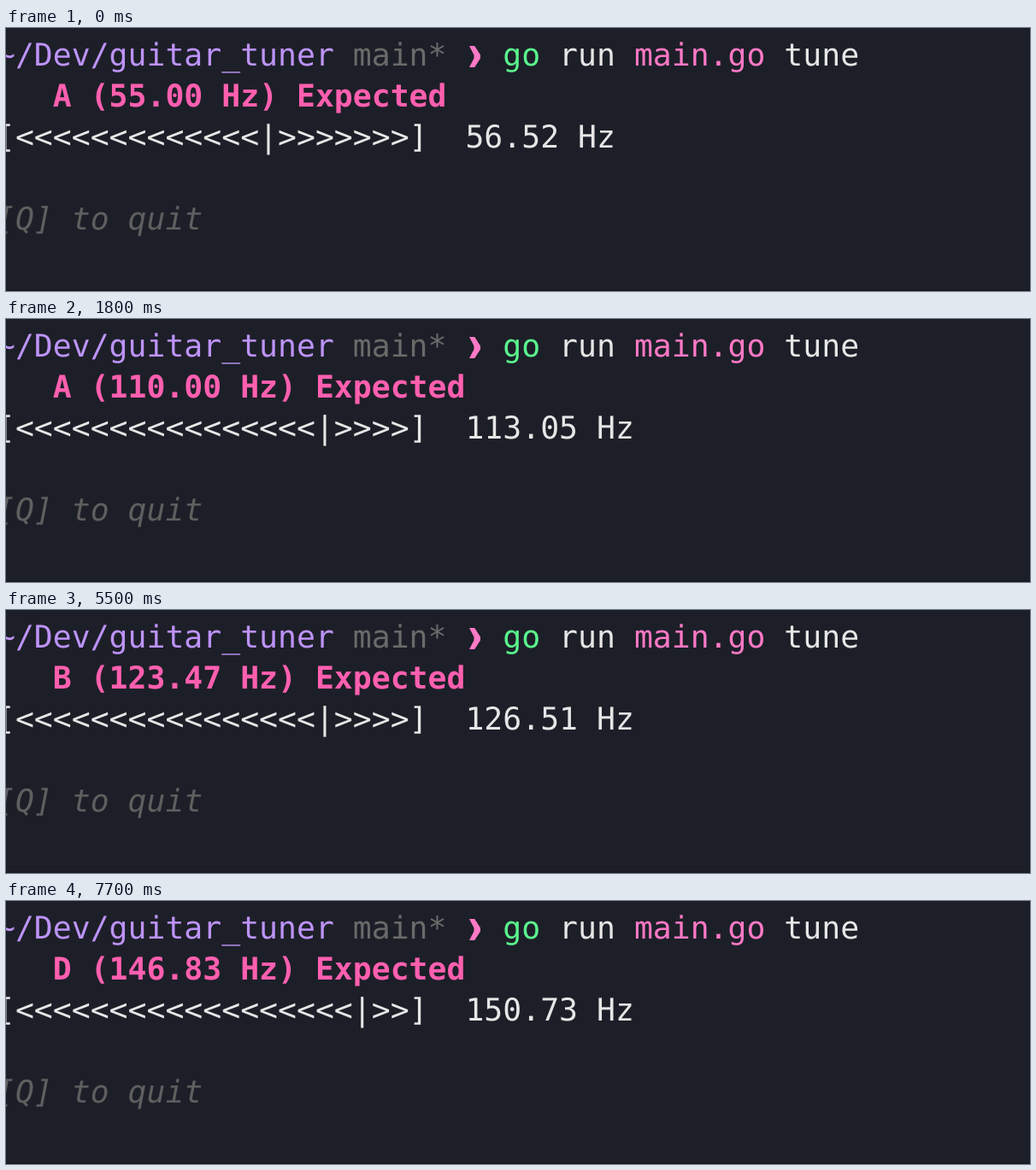
An HTML page for the animation above (8000 ms loop, 1198x308 px).

```html
<!DOCTYPE html>
<html lang="en">
<head>
<meta charset="utf-8">
<title>Guitar tuner</title>
<style>
  html, body { margin: 0; width: 100%; height: 100%; overflow: hidden; background: #1d1f28; }
  body { box-shadow: inset -1px -2px #181921; }
  pre {
    position: absolute; left: -11px; top: 8.4px; margin: 0;
    font: 36.45px/48px "DejaVu Sans Mono", monospace;
    text-rendering: geometricPrecision; color: #e6e6e6;
  }
  .path { color: #bd93f9; }
  .branch { color: #6a6a6a; }
  .cmd { color: #5af78e; }
  .file { color: #ff79c6; }
  #note { color: #ff5faf; font-weight: bold; }
  .hint { color: #5f5f5f; font-style: italic; }
  #prompt {
    position: absolute; left: 542px; top: 21px; width: 13px; height: 25px; background: #ff79c6;
    clip-path: polygon(0 0, 48% 0, 100% 42%, 100% 58%, 48% 100%, 0 100%, 42% 58%, 42% 42%);
  }
</style>
</head>
<body>
<pre><span class="path">~/Dev/guitar_tuner</span> <span class="branch">main*</span>   <span class="cmd">go</span> run <span class="file">main.go</span> tune
<span id="note"></span>
<span id="meter"></span>

<span class="hint">[Q] to quit</span></pre>
<div id="prompt"></div>
<script>
const LOOP = 8000;
const REDRAW = 100;        // ms between screen updates
const HOP = 371.4;         // ms of sound per reading
const LEAD = 99.5;         // ms of sound already heard when the loop starts
const BIN = 44100 / 16384; // Hz per spectrum bin
const NAMES = ["A", "A#", "B", "C", "C#", "D", "D#", "E", "F", "F#", "G", "G#"];

// Strongest spectrum bin of each pitch, in order
const PEAKS = [21, 43, 42, 48, 45, 47, 47, 48, 97, 47, 49, 50, 56];

const note = document.getElementById("note");
const meter = document.getElementById("meter");

// The first pitches ring for four readings each, later ones for one.
function peakAt(time) {
  const screenTime = Math.floor(time / REDRAW) * REDRAW;
  const reading = Math.floor((screenTime + LEAD) / HOP);
  return PEAKS[Math.max(Math.ceil(reading / 4), reading - 9)];
}

function nearestNote(hz) {
  const step = Math.round(12 * Math.log2(hz / 55));
  return { name: NAMES[step % 12], hz: 55 * 2 ** (step / 12) };
}

function show(hz) {
  const goal = nearestNote(hz);
  const needle = Math.max(0, Math.min(20, Math.round(10 + 2 * (hz - goal.hz))));
  note.textContent = `   ${goal.name} (${goal.hz.toFixed(2)} Hz) Expected`;
  meter.textContent = `[${"<".repeat(needle)}|${">".repeat(20 - needle)}]  ${hz.toFixed(2)} Hz`;
}

function frame() {
  show(peakAt(performance.now() % LOOP) * BIN);
  requestAnimationFrame(frame);
}
frame();
</script>
</body>
</html>
```
